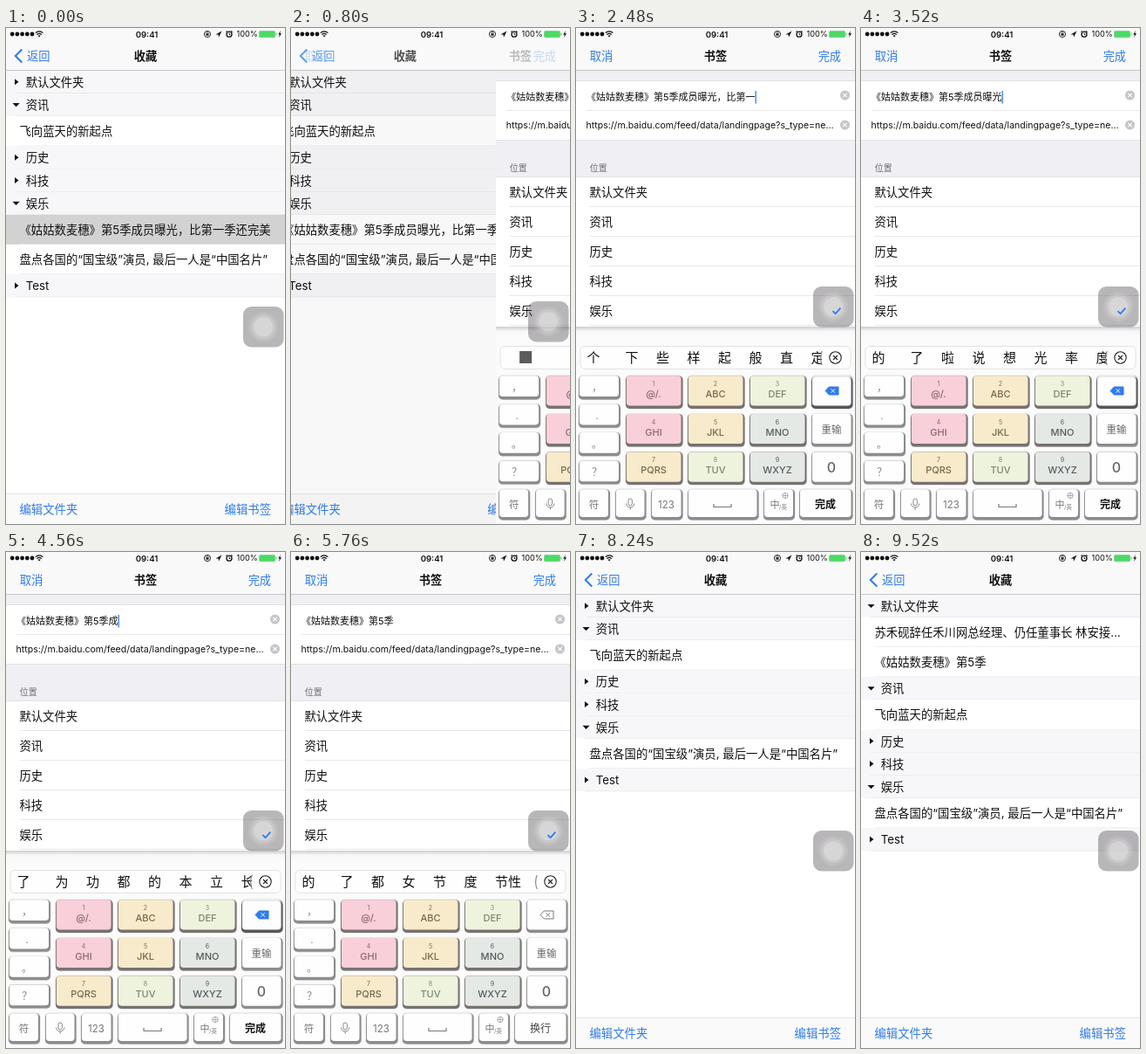
These frames come from a looping animation (320 px wide and 568 px high, 9.6 s). An HTML page:

```html
<!DOCTYPE html>
<html lang="zh-CN">
<head>
<meta charset="utf-8">
<title>收藏</title>
<style>
html, body { margin: 0; width: 100%; height: 100%; overflow: hidden; background: #fff; }
svg { display: block; width: 320px; height: 568px; }
text { font-family: Inter, "Noto Sans CJK SC", "Noto Sans CJK", sans-serif; }
</style>
</head>
<body>
<svg id="stage" viewBox="0 0 320 568" xmlns="http://www.w3.org/2000/svg"></svg>
<script>
const LOOP = 9600, BLUE = '#2f7bf0', INK = '#111', ROW = 34.1, HEAD = 26.2, TOP = 48.7;
const HEADLINE = '《姑姑数麦穗》第5季成员曝光，比第一季还完美';
const clamp = v => Math.max(0, Math.min(1, v));
const prog = (t, start, dur) => clamp((t - start) / dur);
const easeOut = p => 1 - (1 - p) ** 3;
const easeInOut = p => p * p * (3 - 2 * p);

// y is the vertical centre of the glyphs
const text = (x, y, s, size = 13.35, fill = INK, more = '') =>
  `<text x="${x}" y="${y + size * 0.375}" font-size="${size}" fill="${fill}" ${more}>${s}</text>`;
const mid = 'text-anchor="middle"';
const rect = (x, y, w, h, fill, more = '') =>
  `<rect x="${x}" y="${y}" width="${w}" height="${h}" fill="${fill}" ${more}/>`;
const line = (x, y, fill = '#e8e8ea') => rect(x, y, 320 - x, 1, fill);
const path = (d, stroke, width = 1, fill = 'none', more = '') =>
  `<path d="${d}" stroke="${stroke}" stroke-width="${width}" fill="${fill}" ${more}/>`;
const circle = (x, y, r, fill, more = '') => `<circle cx="${x}" cy="${y}" r="${r}" fill="${fill}" ${more}/>`;
const group = (id, inner, more = '') => `<g id="${id}" ${more}>${inner}</g>`;

// ---- bookmark list ----
const rows = [
  { head: '默认文件夹', lateOpen: true },
  { item: '苏禾砚辞任禾川网总经理、仍任董事长 林安接…', late: true },
  { item: '《姑姑数麦穗》第5季', late: true },
  { head: '资讯', open: true },
  { item: '飞向蓝天的新起点' },
  { head: '历史' },
  { head: '科技' },
  { head: '娱乐', open: true },
  { item: HEADLINE, early: true },
  { item: '盘点各国的“国宝级”演员, 最后一人是“中国名片”' },
  { head: 'Test' }
];

function listRow(r, i) {
  if (!r.head) {
    const hi = r.early ? rect(0, 0, 320, ROW, '#d3d2d3', 'id="press"') : '';
    return group('row' + i, rect(0, 0, 320, ROW, '#fff') + hi +
      rect(16, ROW - 0.5, 304, 0.6, '#e2e2e5') + text(15.5, 17, r.item));
  }
  const shut = path('M10 9.5L14.5 13L10 16.5Z', 'none', 0, INK, 'class="shut"');
  const open = path('M7.5 11.2H15.7L11.6 15.4Z', 'none', 0, INK, 'class="open"');
  return group('row' + i, rect(0, 0, 320, HEAD, '#f7f7f9') +
    rect(11, HEAD - 0.5, 309, 0.6, '#e0e0e4') + shut + open + text(22.7, 13.3, r.head));
}

const listPage = rect(0, 0, 320, 568, '#fff') + rows.map(listRow).join('') +
  rect(0, 533, 320, 35, '#fafafb') + line(0, 533, '#e4e4e6') +
  text(15.5, 551, '编辑文件夹', 13.35, BLUE) +
  text(304, 551, '编辑书签', 13.35, BLUE, 'text-anchor="end"');

// ---- edit form ----
const clearBtn = y => circle(308.5, y, 5.5, '#c5c5ca') +
  path(`M306.3 ${y - 2.2}l4.4 4.4m0 -4.4l-4.4 4.4`, '#fff', 1.1);
const folders = ['默认文件夹', '资讯', '历史', '科技', '娱乐', 'Test'];

const formPage = rect(0, 0, 320, 568, '#efeff4') +
  rect(0, 61, 320, 67, '#fff') + line(0, 60, '#e2e2e6') +
  line(12, 94) + line(0, 128, '#e2e2e6') +
  text(12, 79, '', 11, INK, 'id="field"') + rect(0, 72, 1.3, 14.5, BLUE, 'id="caret"') +
  text(11.6, 111, 'https://m.baidu.com/feed/data/landingpage?s_type=ne…', 10.55) +
  clearBtn(77) + clearBtn(111) +
  text(15.7, 160, '位置', 10, '#6d6d72') +
  rect(0, 171, 320, 204, '#fff') + line(0, 170, '#e2e2e6') +
  folders.map((f, i) => text(15.4, 188 + i * 34, f) + line(i < 5 ? 16 : 0, 204 + i * 34)).join('');
const check = path('M294.4 188.2L297.6 191.2L303.4 184.6', BLUE, 1.8);

// ---- keyboard ----
const key = (x, y, w, h, fill = '#fefefe', edge = '#8c8c8f') =>
  rect(x - 0.4, y - 0.4, w + 0.9, h + 1.4, '#dededf', 'rx="5"') +
  rect(x, y + 0.4, w, h, edge, 'rx="4.5"') +
  rect(x + 0.9, y + 0.2, w - 2.9, h - 3.2, fill, 'rx="3.8"');
const label = (x, y, s, size, fill = '#77777a', more = '') => text(x, y, s, size, fill, mid + ' ' + more);

const PINK = ['#f9d0da', '#8a666e'], SAND = ['#f8ebcb', '#77694a'],
  LIME = ['#eef3dd', '#7c8470'], MIST = ['#e5e9e6', '#555b5c'];
const pads = [['@/.', PINK], ['ABC', SAND], ['DEF', LIME], ['GHI', PINK], ['JKL', SAND],
  ['MNO', MIST], ['PQRS', SAND], ['TUV', LIME], ['WXYZ', MIST]];
const padKey = ([s, [face, ink]], i) => {
  const x = 57 + (i % 3) * 71, y = 398 + Math.floor(i / 3) * 43.6;
  return key(x, y, 65.5, 37.5, face, '#777270') + label(x + 32, y + 9.5, i + 1, 7, ink) +
    label(x + 32, y + 21, s, 11, ink, 'font-weight="500"');
};
const eraser = (fill, stroke, x) =>
  path('M286 415.5L290.3 411H301V420H290.3Z', stroke, 1, fill) +
  path('M292.5 413.3l4.4 4.4m0 -4.4l-4.4 4.4', x, 1);
const leaf = a => `<ellipse cx="221" cy="373.7" rx="2.5" ry="3" transform="rotate(${a} 221 377.4)" fill="none" stroke="#666" stroke-width="1.1"/>`;

const tools = rect(27, 370, 14, 14, '#5c5c5e') +
  circle(96, 377.5, 7, 'none', 'stroke="#666"') + circle(93.5, 375.5, 0.9, '#666') +
  circle(98.5, 375.5, 0.9, '#666') + path('M92.3 379q3.7 4.5 7.4 0', '#666') +
  rect(152, 372, 14, 11, 'none', 'stroke="#666" rx="1"') +
  path('M154 375h10M154 377.7h10', '#666', 1.2, 'none', 'stroke-dasharray="1.4 1.4"') +
  path('M156 380.5h6', '#666') + [45, 135, 225, 315].map(leaf).join('') +
  path('M278 374.5H291L284.5 381Z', '#666');
const candidates = '<g id="words" clip-path="url(#bar)"></g>' +
  path('M282.2 370Q279 378 282.2 386', '#8a8a8c', 1.2) +
  circle(297.5, 377.5, 6.7, 'none', 'stroke="#222" stroke-width="1.1"') +
  path('M295 375l5 5m0 -5l-5 5', '#222', 1.1);

const keyboard = rect(0, 342, 320, 226, '#fbfbfb') + rect(0, 342, 320, 12, 'url(#lip)') +
  rect(5, 364.5, 310, 26, '#fefefe', 'rx="5" stroke="#dcdcde" stroke-width=".8"') +
  group('tools', tools) + group('cands', candidates) +
  ['，', '.', '。', '？'].map((s, i) => key(3, 398 + i * 32.4, 48, 27) +
    label(24, 411.5 + i * 32.4, s, 12, '#88888b')).join('') +
  pads.map(padKey).join('') +
  key(270, 398, 47.5, 37.5) + key(270, 441.6, 47.5, 37.5) + key(270, 485.2, 47.5, 37.5) +
  group('eraseUp', eraser('none', '#77777a', '#77777a')) +
  group('eraseDown', key(270, 399.5, 47.5, 36, '#fdfdfd', '#55575b') + eraser(BLUE, BLUE, '#fff')) +
  label(293, 459.5, '', 11.5, '#66666a', 'id="midKey"') + label(293, 503, '0', 16, '#66666a', 'font-weight="500"') +
  key(3, 528, 36, 35) + label(20.5, 545.5, '符', 11.5) +
  key(45, 528, 35.5, 35) + rect(60, 539, 4.4, 8, 'none', 'rx="2.2" stroke="#88888b"') +
  path('M57.6 544.5a4.6 4.6 0 0 0 9.2 0M62.2 549v2.6', '#88888b') +
  key(86, 528, 36.5, 35) + label(103.5, 545.5, '123', 11.5) +
  key(128, 528, 81.5, 35) + path('M158 545v3.5H178V545', '#77777a', 1.2) +
  key(215, 528, 36, 35) + label(228, 546, '中', 11) + label(237.5, 548.5, '/英', 6.5) +
  circle(240, 535.5, 3.2, 'none', 'stroke="#88888b" stroke-width=".7"') +
  path('M236.8 535.5h6.4M240 532.3v6.4', '#88888b', 0.6) +
  key(256, 528, 61.5, 35) + label(286, 545.5, '', 12, '#222', 'id="enter"');

// ---- bars and floating button ----
const title = (id, s) => text(160, 32, s, 13.2, INK, `${mid} font-weight="600" id="${id}"`);
const navList = path('M18.3 24.5L10.8 32L18.3 39.5', BLUE, 2) + text(24, 32, '返回', 13.2, BLUE) + title('listTitle', '收藏');
const navForm = text(15.7, 32, '取消', 13.4, BLUE) + title('formTitle', '书签') +
  text(304, 32, '完成', 13.2, BLUE, 'text-anchor="end" id="done"');

const status = [0, 1, 2, 3, 4].map(i => circle(7.2 + i * 5.7, 7, 2.4, INK)).join('') +
  path('M33.8 5.6a6 6 0 0 1 8.6 0M35.4 7.6a3.8 3.8 0 0 1 5.4 0', INK, 1.3) +
  path('M36.5 8.8L38.1 10.6L39.7 8.8Q38.1 7.6 36.5 8.8Z', 'none', 0, INK) +
  text(161.5, 7, '09:41', 9.6, INK, mid + ' font-weight="600"') +
  circle(231, 7, 3.6, 'none', `stroke="${INK}" stroke-width=".9"`) + rect(229.5, 6.3, 3, 2.4, INK) +
  path('M229.9 6.5v-.8a1.1 1.1 0 0 1 2.2 0v.8', INK, 0.6) +
  path('M240.4 7.4L247.4 3.6L244 10.8L243.6 7.6Z', 'none', 0, INK) +
  circle(256, 7.2, 3, 'none', `stroke="${INK}" stroke-width="1.3"`) +
  path('M256 5.6v1.8h1.3M252.2 4.6l1.6 -1.4M259.8 4.6l-1.6 -1.4', INK, 1) +
  text(264.5, 7, '100%', 9.2) +
  rect(290.5, 3.4, 18, 7.4, '#4cd964', 'rx="1.3" stroke="#6fc97e" stroke-width=".6"') +
  rect(309.4, 5.6, 1.1, 3, '#4cd964') + path('M315 3L312.2 7.6H313.9L313 11L316 6.3H314.2Z', 'none', 0, INK);

const knob = rect(272, 319, 46.5, 46.5, '#3c373a', 'rx="9.5" opacity=".36"') +
  [[17, 0.1], [14, 0.16], [11, 0.26]].map(([r, a]) => circle(295.2, 342.3, r, '#fff', `opacity="${a}"`)).join('');

document.getElementById('stage').innerHTML = `<defs>
  <clipPath id="bar"><rect x="6" y="364" width="276" height="27"/></clipPath>
  <linearGradient id="lip" x2="0" y2="1"><stop offset="0" stop-color="#cfcfd2"/>
  <stop offset=".25" stop-color="#e4e4e6"/><stop offset=".4" stop-color="#f7f7f8"/><stop offset="1" stop-color="#fbfbfb"/></linearGradient></defs>` +
  group('list', listPage) + rect(0, 0, 320, 568, '#000', 'id="dim"') +
  group('form', formPage) + group('kb', keyboard) +
  rect(0, 0, 320, 48, '#f9f9fa') + line(0, 48, '#c6c6c9') +
  group('navList', navList) + group('navForm', navForm) + status + group('knob', knob) + group('check', check);

// ---- motion ----
const el = {};
document.querySelectorAll('[id]').forEach(n => el[n.id] = n);
const move = (id, x, y) => el[id].setAttribute('transform', `translate(${x} ${y})`);
const fade = (id, a) => el[id].setAttribute('opacity', a);
const show = (node, on) => node.setAttribute('visibility', on ? 'inherit' : 'hidden');
const put = (id, s) => { if (el[id].textContent !== s) el[id].textContent = s; };

// eight quick taps, then four slower ones
const taps = Array.from({ length: 12 }, (_, i) => i < 8 ? 1640 + i * 260 : 3800 + (i - 8) * 350);
const SEASON = '的 了 都 女 节 度 节性';
const guesses = ['成 了 全 美 善 的 整 毕', '是 有 没 在 要 能 会 不', SEASON, '个 下 些 样 起 般 直 定',
  '一 二 三 次 五 天 四 个', '较 如 赛 例 我 他 你 的', '我 你 这 但 不 就 他 那',
  '的 了 啦 说 想 光 率 度', '光 的 了 出 在 晒 露 料', '工 的 们 和 是 在 都 会',
  '了 为 功 都 的 本 立 长', SEASON];

function showWords(n) {
  if (el.words.dataset.n === String(n)) return;
  el.words.dataset.n = n;
  let x = 12.5;
  el.words.innerHTML = guesses[n - 1].split(' ').map((w, i) => {
    const out = text(x, 377.5, w, 15);
    x += i ? 20.5 + 15 * w.length : 44;
    return out;
  }).join('');
}

function drawList(t) {
  const grow = easeInOut(prog(t, 8840, 360));
  let y = TOP;
  rows.forEach((r, i) => {
    const id = 'row' + i, node = el[id];
    const part = r.late ? grow : r.early ? +(t < 4000) : 1;
    move(id, 0, y);
    show(node, part > 0);
    if (r.late) fade(id, part);
    if (r.head) {
      const open = r.open || (r.lateOpen && t >= 8880);
      show(node.querySelector('.open'), open);
      show(node.querySelector('.shut'), !open);
    }
    y += (r.head ? HEAD : ROW) * part;
  });
  fade('press', 1 - prog(t, 560, 80));
}

function drawForm(t) {
  const n = taps.filter(d => t >= d).length;
  put('field', HEADLINE.slice(0, HEADLINE.length - n));
  const typing = t >= taps[0] - 100 && t < taps[11] + 300;
  show(el.caret, t > 1100 && t < 5700 && (typing || (t - 1100) % 1000 < 550));
  el.caret.setAttribute('x', 12 + el.field.getComputedTextLength());
  fade('done', t >= 7440 ? 1 - 0.8 * prog(t, 7400, 120) : 1);

  if (n) showWords(n);
  show(el.tools, !n);
  show(el.cands, n > 0);
  const down = taps.some(d => t >= d - 40 && t < d + 100);
  show(el.eraseDown, down);
  show(el.eraseUp, !down);
  put('midKey', n ? '重输' : '换行');
  const editing = t < 5700;
  put('enter', editing ? '完成' : '换行');
  el.enter.setAttribute('font-weight', editing ? 600 : 400);
  el.enter.setAttribute('fill', editing ? '#111' : '#444');
}

function draw(t) {
  const p = easeOut(prog(t, 760, 420)) - easeOut(prog(t, 7680, 500));
  const hide = easeInOut(prog(t, 5860, 300));
  const x = 320 * (1 - p);
  drawList(t);
  drawForm(t);
  move('list', -96 * p, 0);
  fade('dim', 0.1 * p);
  move('form', x, 0);
  move('check', x, t < 6400 ? 136 : 0);
  move('kb', x, 226 * hide);
  show(el.form, p > 0);
  show(el.check, p > 0);
  show(el.kb, p > 0 && hide < 1);
  fade('navList', 1 - p);
  fade('navForm', p);
  move('listTitle', -110 * p, 0);
  move('formTitle', 140 * (1 - p), 0);
  move('knob', 0, -23 * (easeOut(prog(t, 760, 420)) - hide));
}

const start = performance.now();
function tick() {
  draw((performance.now() - start) % LOOP);
  requestAnimationFrame(tick);
}
tick();
</script>
</body>
</html>
```
